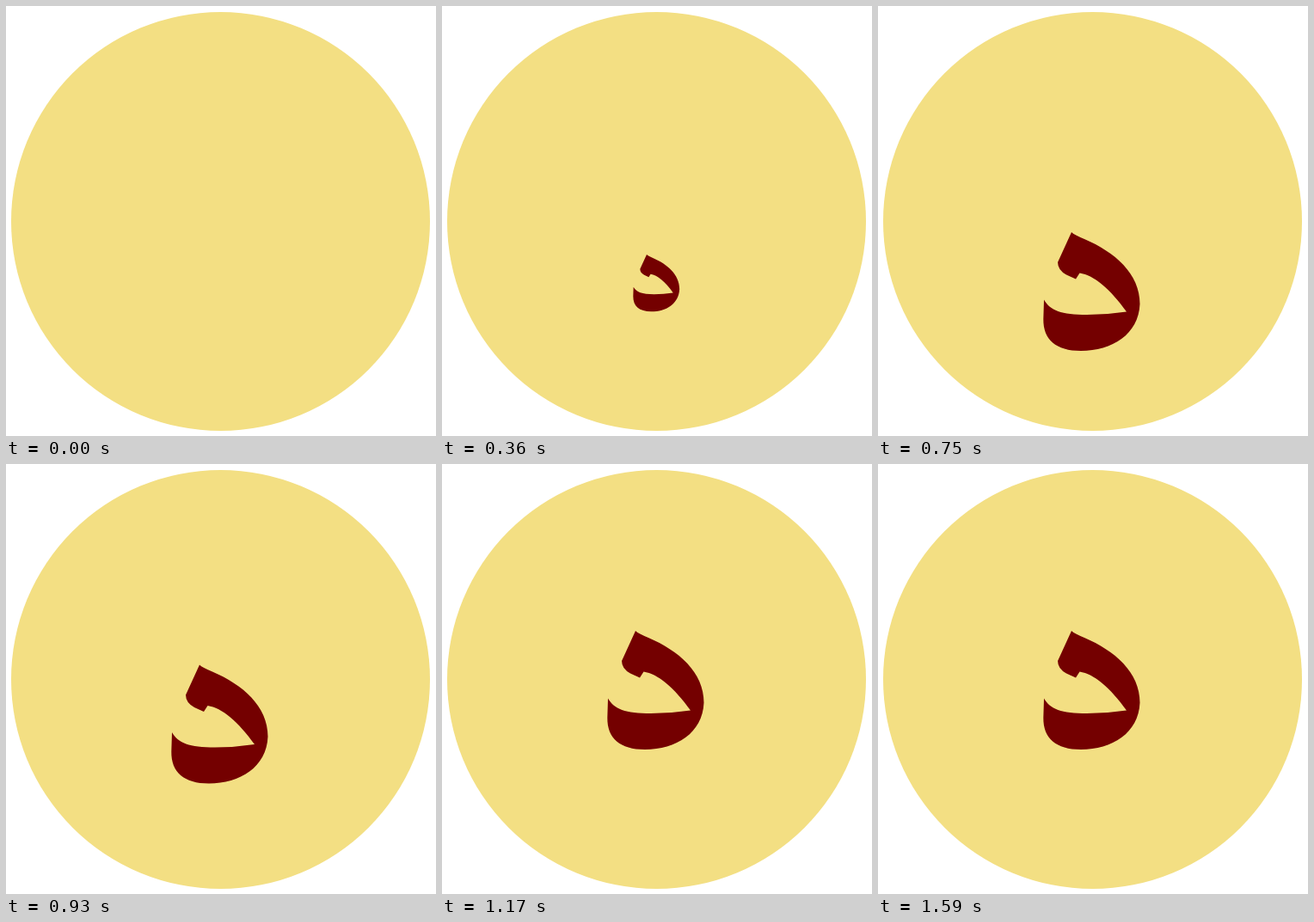
Animation of 500x500 px, one loop 2100 ms. Source, as an HTML page with a canvas:

```html
<!DOCTYPE html>
<html lang="en">
<head>
<meta charset="utf-8">
<title>Bouncing letter</title>
<style>
html, body { margin: 0; width: 100%; height: 100%; overflow: hidden; background: #fff; }
canvas { display: block; width: 500px; height: 500px; }
</style>
</head>
<body>
<canvas id="stage" width="500" height="500"></canvas>
<script>
const ctx = document.getElementById('stage').getContext('2d');
const LOOP = 2100, STEP = 30;
const HOME = { x: 250, y: 213 };
const MAX_SWING = 11 * Math.PI / 180;

const letter = new Path2D(`M225 194 Q228 197 240 202
  C275 217 304.5 242 304.5 277.5 C303 313 272 332 236 332
  C207 332 192 319 192.3 295 L193 272.5 C200 285 213 290 243 290
  Q266 290 289 286.5 C270 260 251 244 234.5 241.5 L230 248.5
  L219 243.5 Q209 238 209 229 Z`);

// 0 before `from`, 1 after `to`, linear between
const ramp = (t, from, to) => Math.min(1, Math.max(0, (t - from) / (to - from)));

// 0 to 1 at `low`, then back to 0
const dip = (t, from, low, to) => ramp(t, from, low) - ramp(t, low, to);

const wave = (t, from, to, turns) => Math.sin(2 * Math.PI * turns * ramp(t, from, to));

function heightAt(t) {
  const entry = -70 * (1 - ramp(t, 0, 210));
  return HOME.y + entry + 146 * dip(t, 0, 210, 570) + 69 * dip(t, 570, 750, 1170);
}

function swingAt(t) {
  return MAX_SWING * (wave(t, 750, 930, 0.5) - wave(t, 930, 1170, 0.5) + wave(t, 1200, 1590, 1));
}

function draw(t) {
  ctx.fillStyle = '#fff';
  ctx.fillRect(0, 0, 500, 500);

  ctx.fillStyle = '#f3df83';
  ctx.beginPath();
  ctx.arc(249.5, 250.5, 243.5, 0, Math.PI * 2);
  ctx.fill();

  const scale = ramp(t, 0, 750);
  if (scale === 0) return;
  ctx.save();
  ctx.translate(HOME.x, heightAt(t));
  ctx.rotate(swingAt(t));
  ctx.scale(scale, scale);
  ctx.translate(-HOME.x, -HOME.y);
  ctx.fillStyle = '#740000';
  ctx.fill(letter);
  ctx.restore();
}

const start = performance.now();
function tick() {
  const t = (performance.now() - start) % LOOP;
  draw(Math.floor(t / STEP) * STEP);
  requestAnimationFrame(tick);
}
tick();
</script>
</body>
</html>
```
